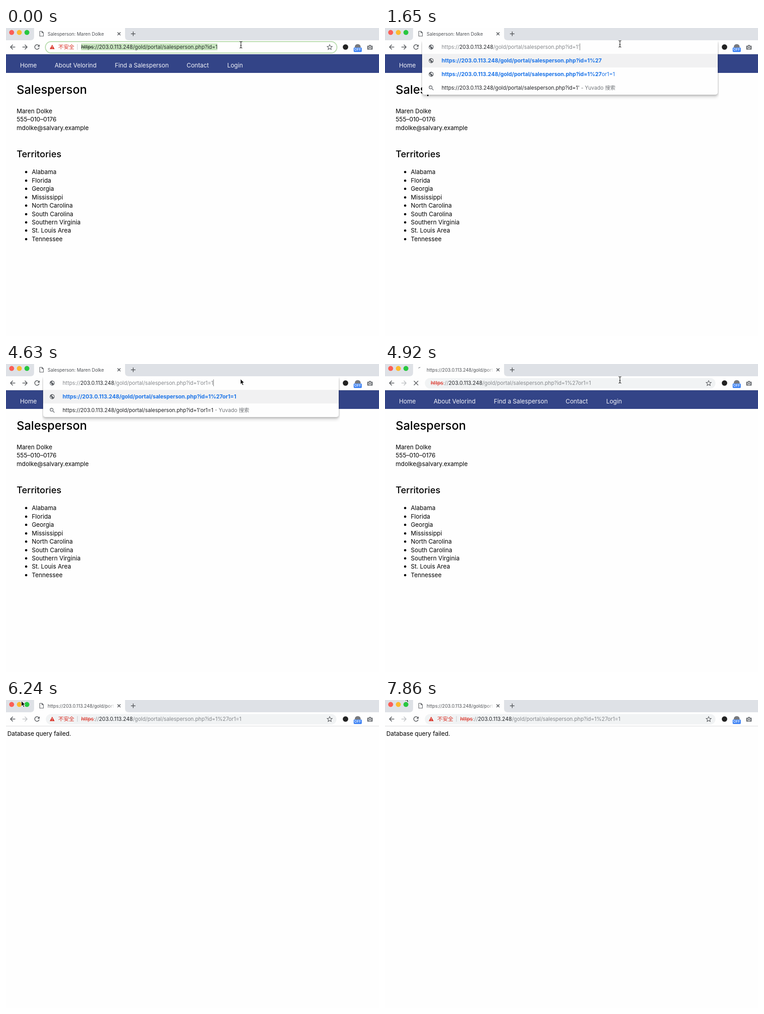
Write an HTML page that moves like this. It is 824 by 679 pixels and loops after 8000 ms.

```html
<!DOCTYPE html>
<html lang="en">
<head>
<meta charset="utf-8">
<title>Salesperson</title>
<style>
html, body { margin: 0; width: 100%; height: 100%; overflow: hidden; background: #fefefe; }
body { position: relative; font: 13.22px/18.44px Inter, "Noto Sans CJK SC", "Noto Sans CJK", sans-serif; color: #000; }
#stage { position: absolute; left: 0; top: 0; width: 824px; height: 679px; overflow: hidden; }
#stage div, svg { position: absolute; white-space: pre; }
svg { left: 0; top: 0; overflow: visible; }

/* page */
#nav { left: 0; top: 58px; width: 824px; height: 41px; background: #334487; color: #f4f5fa; }
#nav div { top: 14.5px; }
h1, h2, ul, p { position: absolute; margin: 0; left: 23.5px; white-space: pre; font-weight: 500; }
h1 { top: 120px; font-size: 26.2px; line-height: 32px; }
h2 { top: 262px; font-size: 20.1px; line-height: 32px; }
p { top: 173.8px; font-weight: 400; }
ul { left: 57px; top: 308.4px; padding: 0; list-style: none; font-weight: 400; }
li { position: relative; }
li::before { content: ""; position: absolute; left: -15.5px; top: 7px; width: 5px; height: 5px; border-radius: 50%; background: #000; }

/* browser frame */
#strip { left: 0; top: 0; width: 824px; height: 27px; background: #dee1e6; }
#bar { left: 0; top: 27px; width: 824px; height: 30px; background: #fefefe; border-bottom: 1px solid #d9dadc; }
.title { left: 92px; top: 4px; width: 147px; overflow: hidden; font-size: 10.05px; line-height: 18px; color: #505357; }
.fade { -webkit-mask-image: linear-gradient(90deg, #000 132px, transparent 148px); mask-image: linear-gradient(90deg, #000 132px, transparent 148px); }
.pill { left: 87.5px; top: 30.5px; width: 642.5px; height: 23px; border-radius: 12px; background: #f1f3f4; }
.ring { left: 86px; top: 29px; width: 641.5px; height: 22.5px; border: 2px solid #b9dcae; border-radius: 14px; background: #fefefe; }
.warn { left: 115.5px; top: 33px; font-size: 11.8px; line-height: 18px; color: #d93025; }
.off { left: 768px; top: 43px; width: 18px; height: 10px; border-radius: 2px; background: #4285f4; color: #fff; font-size: 7.6px; line-height: 10px; text-align: center; font-weight: 500; }

/* address text */
.url, .row { top: 34px; padding-top: 1px; font-size: 11.58px; line-height: 14px; color: #85888c; }
.url { left: 166px; }
.url b { font-weight: 400; color: #222428; }
.url s { color: #d93025; }
.picked, .picked s { color: #26302a; }
.picked { background: #c8e6bf; }
.edit { left: 125px; }
.edit s { color: inherit; text-decoration: none; }
.caret { display: inline-block; width: 1px; height: 15px; margin: -1px -1px 0 0; vertical-align: top; background: #777; }

/* suggestions */
.drop { left: 82px; top: 29px; width: 653px; border-radius: 0 0 5px 5px; background: #fefefe; box-shadow: 0 2px 5px rgba(0,0,0,.26), 0 6px 6px 1px rgba(0,0,0,.09); clip-path: inset(0 -3px -11px -2px); }
.drop .url, .row { left: 43px; top: 5px; }
.hit { left: 0; top: 28px; width: 653px; height: 30px; background: #f1f1f2; }
.link { color: #1a73e8; font-size: 11.9px; }
.link b { font-weight: 700; }
.find { color: #202124; }
.find span { color: #74777b; }

/* timing */
#stage .t, .caret { animation: 8s step-end infinite; }
#stage .page { animation-name: page; }
#stage .fail { animation-name: fail; }
#stage .early { animation-name: early; }
#stage .late { animation-name: late; }
#stage .load { animation-name: load; }
#stage .idle { animation-name: idle; }
#stage .spin { animation-name: spin; transform-origin: 78px 12.5px; }
#stage .focus { animation-name: focus; }
#stage .pick { animation-name: pick; }
#stage .open { animation-name: open; }
#stage .d0 { animation-name: d0; }
#stage .d1 { animation-name: d1; }
#stage .d2 { animation-name: d2; }
#stage .d3 { animation-name: d3; }
#stage .d4 { animation-name: d4; }
#stage .beam { animation-name: beam; }
#stage .arrow { animation-name: arrow; }
#stage .caret { animation-name: caret; }
@keyframes page { 0% { opacity: 1 } 63.375%, to { opacity: 0 } }
@keyframes fail { 0% { opacity: 0 } 63.375%, to { opacity: 1 } }
@keyframes early { 0% { opacity: 1 } 59.625%, to { opacity: 0 } }
@keyframes late { 0% { opacity: 0 } 59.625%, to { opacity: 1 } }
@keyframes load { 0% { opacity: 0 } 59.625% { opacity: 1 } 63.375%, to { opacity: 0 } }
@keyframes idle { 0% { opacity: 1 } 59.625% { opacity: 0 } 63.375%, to { opacity: 1 } }
@keyframes spin {
  0% { opacity: 0; transform: none }
  59.625% { opacity: 1; transform: rotate(-70deg) }
  61.5% { opacity: 1; transform: none }
  63.375%, to { opacity: 0; transform: none }
}
@keyframes focus { 0% { opacity: 1 } 20.625%, to { opacity: 0 } }
@keyframes pick { 0% { opacity: 1 } 1.875%, to { opacity: 0 } }
@keyframes open { 0% { opacity: 0 } 1.875% { opacity: 1 } 20.625%, to { opacity: 0 } }
@keyframes d0 { 0% { opacity: 0 } 20.625% { opacity: 1 } 35.5%, to { opacity: 0 } }
@keyframes d1 { 0% { opacity: 0 } 35.5% { opacity: 1 } 37.375%, to { opacity: 0 } }
@keyframes d2 { 0% { opacity: 0 } 37.375% { opacity: 1 } 41.125%, to { opacity: 0 } }
@keyframes d3 { 0% { opacity: 0 } 41.125% { opacity: 1 } 44.75%, to { opacity: 0 } }
@keyframes d4 { 0% { opacity: 0 } 44.75% { opacity: 1 } 59.625%, to { opacity: 0 } }
@keyframes caret {
  0%, 9.375%, 26.125%, 52.25% { opacity: 0 }
  1.875%, 15%, 31.75%, 57.875%, to { opacity: 1 }
}
@keyframes beam {
  0% { opacity: 1; transform: translate(519px, 37px) }
  9.375% { opacity: 1; transform: translate(519px, 35px) }
  35.5% { opacity: 0; transform: translate(519px, 35px) }
  59.625% { opacity: 1; transform: translate(519px, 35px) }
  67%, to { opacity: 0; transform: translate(519px, 35px) }
}
@keyframes arrow {
  0% { opacity: 0; transform: translate(518px, 33px) }
  35.5% { opacity: 1; transform: translate(518px, 33px) }
  59.625% { opacity: 0; transform: translate(518px, 33px) }
  67% { opacity: 1; transform: translate(455px, 95px) }
  68.875% { transform: translate(340px, 170px) }
  70.625% { transform: translate(215px, 208px) }
  72.5% { transform: translate(110px, 160px) }
  74.375% { transform: translate(45px, 80px) }
  76.125% { transform: translate(18px, 22px) }
  78% { transform: translate(34px, 2px) }
  79.875% { transform: translate(30px, 4px) }
  81.625% { transform: translate(1px, 30px) }
  83.5% { transform: translate(160px, 95px) }
  85.375% { transform: translate(470px, 130px) }
  87.25% { transform: translate(725px, 100px) }
  89.125% { transform: translate(610px, 30px) }
  91% { transform: translate(330px, 8px) }
  92.75% { transform: translate(110px, 1px) }
  94.625% { transform: translate(48px, -20px) }
  96.5% { transform: translate(44px, -8px) }
  98.25%, to { opacity: 1; transform: translate(45px, -9px) }
}
</style>
</head>
<body>
<div id="stage">
  <div class="t page">
    <div id="nav"></div>
    <h1>Salesperson</h1>
    <p>Maren Dolke
555–010–0176
mdolke@salvary.example</p>
    <h2>Territories</h2>
    <ul id="areas"></ul>
  </div>
  <div class="t fail" style="left:3px;top:65px">Database query failed.</div>

  <div id="strip"></div>
  <div id="bar"></div>
  <div class="pill"></div>
  <div class="ring t focus"></div>

  <svg width="824" height="58" fill="none" stroke="#54575b" stroke-width="1.5">
    <path d="M54 27q8 0 8-8V0H263v19q0 8 8 8z" fill="#fefefe" stroke="none"/>
    <g stroke="none">
      <circle cx="12.5" cy="9.8" r="5.5" fill="#fb5f57"/>
      <circle cx="29.4" cy="9.8" r="5.5" fill="#fcbb2f"/>
      <circle cx="46.2" cy="9.8" r="5.5" fill="#28c740"/>
    </g>
    <path class="t idle" d="M74.6 7.2h5l3 3V18h-8zM79.4 7.4v3h3" stroke-width="1.1"/>
    <path class="t spin" d="M73.8 9.4a5.2 5.2 0 0 1 4.2-2.1" stroke="#85888c" stroke-width="1.2"/>
    <path d="M246.4 9.6l6.4 6.4M252.8 9.6l-6.4 6.4M276 12.7h10M281 7.7v10"/>
    <path d="M20.4 42H10M15 36.9L9.9 42l5.1 5.1"/>
    <path class="t early" d="M36.3 42h10.4M41.6 36.9l5.1 5.1-5.1 5.1"/>
    <path class="t late" d="M36.3 42h10.4M41.6 36.9l5.1 5.1-5.1 5.1" stroke="#bfc1c4"/>
    <g class="t idle">
      <path d="M72.3 38.6a5 5 0 1 0 1 4.7"/>
      <path d="M74.3 36.2v5h-5z" fill="#54575b" stroke="none"/>
    </g>
    <path class="t load" d="M63.9 37.3l9.4 9.4M73.3 37.3l-9.4 9.4"/>
    <g class="t idle">
      <path d="M102 36.8l5.4 9.8H96.6z" fill="#d93025" stroke="none"/>
      <path d="M102 40v3.2M102 44.2v1.2" stroke="#fff" stroke-width="1.1"/>
      <path d="M157.8 35.5v12.5" stroke="#c6c8cb" stroke-width="1"/>
    </g>
    <path d="M715 36.6l1.6 3.7 4 .4-3 2.7.9 3.9-3.5-2.1-3.5 2.1.9-3.9-3-2.7 4-.4z" stroke-width="1.1"/>
    <g stroke="none">
      <circle cx="750" cy="42" r="6" fill="#222"/>
      <circle cx="777" cy="42" r="6.6" fill="#77797d"/>
      <path d="M799 39h2.4l1.2-1.7h3l1.2 1.7h2.2q1 0 1 1v6.8q0 1-1 1h-10q-1 0-1-1V40q0-1 1-1z" fill="#76797d"/>
    </g>
    <circle cx="804" cy="43.2" r="2.5" stroke="#fefefe" stroke-width="1.1"/>
  </svg>
  <div class="off">OFF</div>
  <div class="title t early">Salesperson: Maren Dolke</div>
  <div class="title fade t late" id="tabUrl"></div>
  <div class="warn t idle">不安全</div>

  <div class="url picked t pick" data-tail=""></div>
  <div class="url t open" data-tail="" data-caret></div>
  <div class="url t load" data-tail="%27or1=1" style="left:101px"></div>
  <div class="url t fail" data-tail="%27or1=1"></div>
  <div id="drops"></div>

  <svg width="824" height="679">
    <g class="t beam">
      <path d="M-3-7.2q3 0 3 2.2V5q0 2.2-3 2.2M3-7.2q-3 0-3 2.2M3 7.2q-3 0-3-2.2M-1.5 1.5h3" fill="none" stroke="#111" stroke-width="1.1"/>
    </g>
    <path class="t arrow" d="M0 0v11.7l2.6-2.4 2 4.5 2.1-.9-2-4.4h3.6z" stroke="#fff" stroke-width=".9"/>
  </svg>
</div>
<script>
const $ = id => document.getElementById(id);
const scheme = 'https', host = '203.0.113.248', path = '/gold/portal/salesperson.php?id=1';
const plain = `${scheme}:` + `//${host}${path}`;
const caret = '<span class="caret"></span>';
const url = tail => `<s>${scheme}</s>://<b>${host}</b>${path}${tail}`;

const links = { Home: 31, 'About Velorind': 107.5, 'Find a Salesperson': 240.5, Contact: 399, Login: 488.7 };
$('nav').innerHTML = Object.entries(links)
  .map(([name, x]) => `<div style="left:${x}px">${name}</div>`).join('');

$('areas').innerHTML = ['Alabama', 'Florida', 'Georgia', 'Mississippi', 'North Carolina',
  'South Carolina', 'Southern Virginia', 'St. Louis Area', 'Tennessee']
  .map(name => `<li>${name}</li>`).join('');

$('tabUrl').textContent = plain;
document.querySelectorAll('[data-tail]').forEach(el => {
  el.innerHTML = url(el.dataset.tail) + ('caret' in el.dataset ? caret : '');
});

// Icons are centred on x = 20 inside the suggestion panel.
const globe = y => `<g transform="translate(20 ${y})"><circle r="5.4" fill="#5f6368"/>
  <path d="M-4.3-1l2.5 2.3v1.2l1.3 1v.9Q-4 3.8-4.3-1zM.5-4.2V-3l-1.6.8v1.3h3v1.7h1.3l.6 1.5Q5.4-1.8.5-4.2z" fill="#fefefe"/></g>`;
const lens = y => `<g transform="translate(20 ${y})" fill="none" stroke="#5f6368" stroke-width="1.3">
  <circle cx="-1.2" cy="-1.2" r="3.3"/><path d="M1.3 1.3L5 5"/></g>`;

const goal = 'or1=1';
const row = (n, kind, html) => `<div class="row ${kind}" style="top:${5 + 30 * n}px">${html}</div>`;

function panel(typed, i) {
  const rest = goal.slice(typed.length);
  const last = rest ? 3 : 2;
  const mid = 13;
  let icons = globe(mid) + globe(mid + 30) + lens(mid + 30 * last);
  if (rest) icons += globe(mid + 60);
  return `<div class="drop t d${i}" style="height:${28 + 30 * last}px"><div class="hit"></div>
    <svg width="40" height="120">${icons}</svg>
    <div class="url edit">${url("'" + typed)}${caret}</div>`
    + row(1, 'link', `<b>${plain}%27${typed}</b>`)
    + (rest ? row(2, 'link', `<b>${plain}%27${typed}</b>${rest}`) : '')
    + row(last, 'find', `${plain}'${typed}<span> - Yuvado 搜索</span>`)
    + '</div>';
}
$('drops').innerHTML = ['', 'o', 'or', 'or1', goal].map(panel).join('');
</script>
</body>
</html>
```
